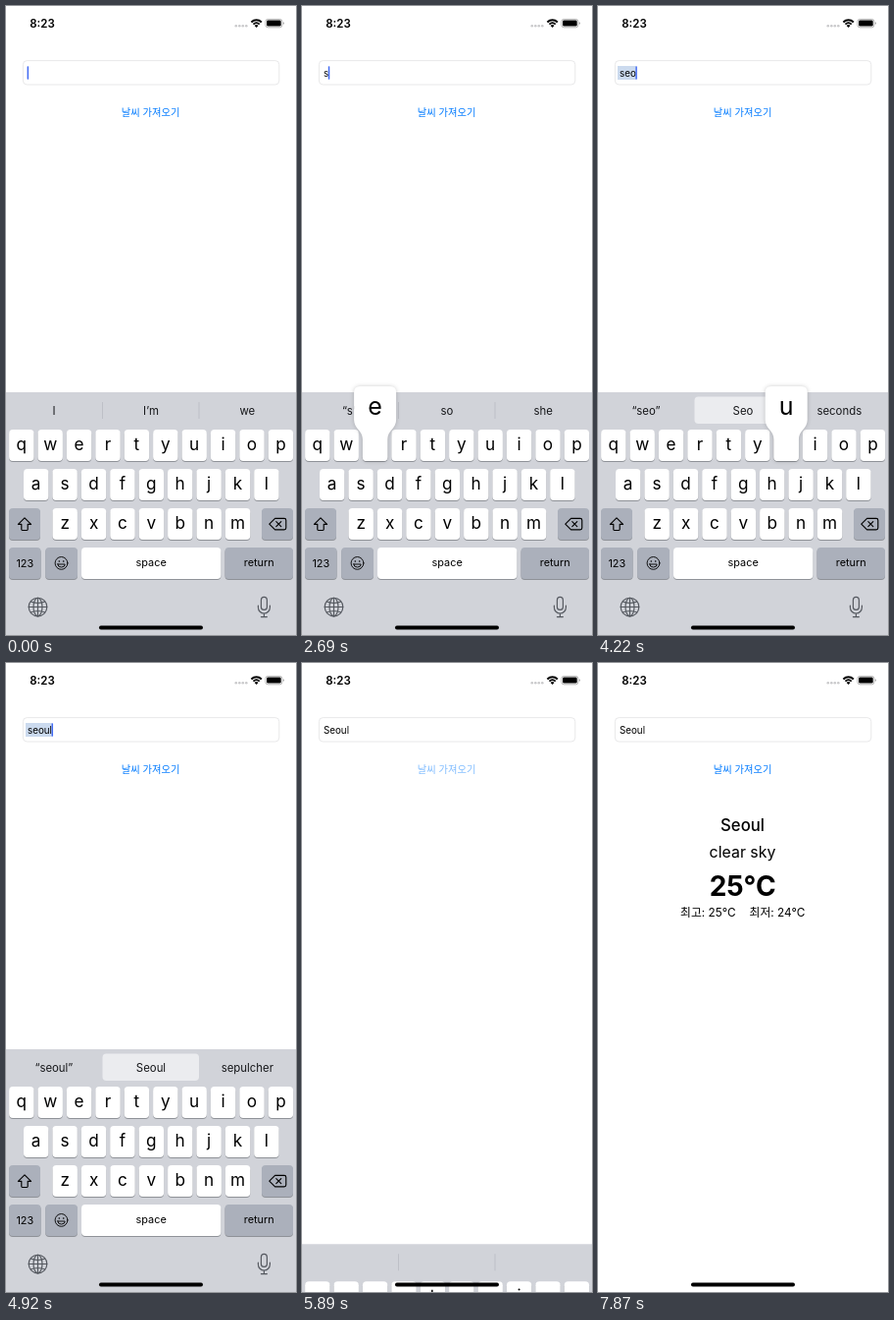
Recreate the animation shown at these times as an HTML page. Size 296 by 640 pixels, loop 8 s.

```html
<!DOCTYPE html>
<html lang="ko">
<head>
<meta charset="utf-8">
<title>Weather lookup</title>
<style>
  html, body { margin: 0; width: 100%; height: 100%; overflow: hidden; background: #fff; }
  svg { display: block; width: 100vw; height: 100vh; }
  text { font-family: Inter, "Noto Sans CJK KR", "Noto Sans CJK", sans-serif; text-anchor: middle; }
  .left { text-anchor: start; }
  .hangul { font-family: "Noto Sans CJK KR", "Noto Sans CJK", sans-serif; }
  .letter { font-size: 17.2px; }
  .label { font-size: 10.9px; }
  .line { fill: none; stroke: #000; stroke-width: 1.15; stroke-linecap: round; stroke-linejoin: round; }
  .thin { stroke-width: .9; }
  .gray { stroke: #53575e; }
  #popup { filter: drop-shadow(0 .5px 2px rgba(0, 0, 0, .2)); }
</style>
</head>
<body>
<svg id="stage" viewBox="0 0 296 640">
  <defs>
    <linearGradient id="sweep">
      <stop offset="0" stop-color="#16171a"/>
      <stop offset="1" stop-color="#16171a" stop-opacity="0"/>
    </linearGradient>
  </defs>
  <rect width="296" height="640" fill="#fff"/>

  <g id="status">
    <text x="37" y="22" font-size="11.5" font-weight="600">8:23</text>
    <g fill="#c9c9cb">
      <circle cx="234.8" cy="20.3" r="1.3"/><circle cx="238.3" cy="20.3" r="1.3"/>
      <circle cx="241.8" cy="20.3" r="1.3"/><circle cx="245.3" cy="20.3" r="1.3"/>
    </g>
    <path d="M250.4 16.5a7.3 7.3 0 0 1 10.4 0M252.5 18.6a4.4 4.4 0 0 1 6.2 0" fill="none" stroke="#000" stroke-width="1.9"/>
    <path d="M255.6 22l-1.9-2a2.7 2.7 0 0 1 3.8 0z"/>
    <rect x="264.9" y="13.4" width="17" height="8.4" rx="2.4" fill="none" stroke="#a3a3a3" stroke-width=".8"/>
    <rect x="266.1" y="14.6" width="14.6" height="6" rx="1.4"/>
    <path d="M282.8 16.2q1.2.4 1.2 1.4t-1.2 1.4z" fill="#a3a3a3"/>
  </g>

  <rect x="17.4" y="55.6" width="261.4" height="24.4" rx="4" fill="#fff" stroke="#e2e2e4" stroke-width=".8"/>
  <rect id="marked" x="20" y="61" height="14" fill="#cbdaee"/>
  <text id="city" class="left" x="22" y="71.8" font-size="9.8"></text>
  <rect id="caret" y="61.3" width="1.5" height="13.4" rx=".6" fill="#426bf2"/>
  <text id="button" class="hangul" x="147.6" y="111.6" font-size="10.3" fill="#007aff">날씨 가져오기</text>

  <g id="weather">
    <text x="147.5" y="171.2" font-size="16.7" font-weight="500">Seoul</text>
    <text x="147.5" y="198.4" font-size="15.9">clear sky</text>
    <text x="147.7" y="237.2" font-size="28" font-weight="700">25°C</text>
    <text x="112.4" y="258" font-size="11.8">최고: 25°C</text>
    <text x="183" y="258" font-size="11.8">최저: 24°C</text>
  </g>

  <g id="keyboard">
    <rect y="393" width="296" height="250" fill="#d1d3d9"/>
    <path id="dividers" d="M98.5 403v17M197 403v17" stroke="#b9bcc3" stroke-width=".8"/>
    <rect id="choice" x="98.5" y="397.5" width="98.5" height="27.5" rx="4" fill="#ebecef"/>
    <g id="hints" font-size="11.4" fill="url(#sweep)">
      <text x="49" y="415.6"></text><text x="148" y="415.6"></text><text x="246.3" y="415.6"></text>
    </g>
    <g id="keys"></g>
    <path class="line" d="M19 520.8l-6.6 6.5h3.4v5.3q0 .9.9.9h4.6q.9 0 .9-.9v-5.3h3.4z"/>
    <path class="line" d="M274.6 521.4h9.4q1.8 0 1.8 1.8v7.8q0 1.8-1.8 1.8h-9.4l-5.8-5.7zM275.8 524.6l5 5m0-5l-5 5"/>
    <g>
      <circle class="line thin" cx="56.5" cy="566.9" r="6.4"/>
      <circle cx="54.3" cy="565" r=".8"/><circle cx="58.7" cy="565" r=".8"/>
      <path class="line thin" d="M52.8 568h7.4a3.7 3 0 0 1-7.4 0z"/>
    </g>
    <g class="line gray">
      <circle cx="32.5" cy="611.5" r="9.3"/><ellipse cx="32.5" cy="611.5" rx="4.5" ry="9.3"/>
      <path d="M32.5 602.2v18.6M23.2 611.5h18.6M25.2 606q7.3 3 14.6 0M25.2 617q7.3-3 14.6 0"/>
      <rect x="260.4" y="601.4" width="6" height="13" rx="3"/>
      <path d="M257.4 610v2a6 6 0 0 0 12 0v-2M263.4 618v3.6M260.4 621.6h6"/>
    </g>
    <g id="popup">
      <path d="M-12.7 28V10C-12.7 1-21.5-1-21.5-10V-38q0-6 6-6h31q6 0 6 6V-10C21.5-1 12.7 1 12.7 10V28q0 4-4 4H-8.7q-4 0-4-4z" fill="#fff"/>
      <text y="-14.8" font-size="25"></text>
    </g>
  </g>

  <rect x="95" y="630.6" width="106" height="3.8" rx="1.9"/>
</svg>
<script>
const LOOP = 8000, DISMISS = 5715, RESULT = 6710;
const $ = selector => document.querySelector(selector);
const show = (el, on) => el.setAttribute('visibility', on ? 'visible' : 'hidden');

const idle = ['I', 'I’m', 'we'];
const afterS = ['“s”', 'so', 'she'];
const afterSe = ['“se”', 'she', 'see'];
const afterSeo = ['“seo”', 'Seo', 'seconds'];
const afterSeou = ['“seou”', 'Seoul', 'sepulcher'];
const afterSeoul = ['“seoul”', 'Seoul', 'sepulcher'];

// time, field text, pressed key, suggestions
const typing = [
  [0, '', '', idle],
  [2200, '', 's', idle],
  [2440, 's', '', idle],
  [2550, 's', '', afterS],
  [2690, 's', 'e', afterS],
  [2950, 'se', '', afterSe],
  [3590, 'se', 'o', afterSe],
  [3820, 'seo', '', afterSe],
  [3970, 'seo', '', afterSeo],
  [4110, 'seo', 'u', afterSeo],
  [4340, 'seou', '', afterSeo],
  [4450, 'seou', '', afterSeou],
  [4680, 'seou', 'l', afterSeou],
  [4920, 'seoul', '', afterSeoul],
  [DISMISS, 'Seoul', '', afterSeoul]
];
const blink = [[0, 1], [530, .5], [650, 0], [890, .5], [1010, 1], [1550, .5], [1670, 0],
  [1920, .06], [2030, 1], [5390, .5], [5510, 0]];
const buttonFade = [[5659, 1], [5660, .25], [5770, .3], [6150, 1]];

const keyAt = {};
function addKey(x, y, width, fill, label, className, baseline) {
  const box = (top, color) =>
    `<rect x="${x}" y="${top}" width="${width}" height="32" rx="4" fill="${color}"/>`;
  $('#keys').insertAdjacentHTML('beforeend', box(y + .9, '#8f9298') + box(y, fill) +
    `<text class="${className}" x="${x + width / 2}" y="${y + baseline}">${label}</text>`);
}
[['qwertyuiop', 15.8], ['asdfghjkl', 30.7], ['zxcvbnm', 60.2]].forEach(([letters, first], row) => {
  [...letters].forEach((letter, i) => {
    const x = first + i * 29.4, y = 431 + row * 40;
    keyAt[letter] = [x, y];
    addKey(x - 12.7, y, 25.4, '#fff', letter, 'letter', 20.6);
  });
});
const dark = '#abb0bb';
addKey(3, 511, 32, dark, '', 'label', 20);
addKey(261, 511, 32, dark, '', 'label', 20);
addKey(3, 551, 32.6, dark, '123', 'label', 19.8);
addKey(40.2, 551, 32.8, dark, '', 'label', 20);
addKey(77, 551, 142.4, '#fff', 'space', 'label', 19.4);
addKey(223.5, 551, 69.5, dark, 'return', 'label', 19.4);

const latest = (table, t) => table.findLast(row => row[0] <= t);

function ramp(table, t) {
  const next = table.findIndex(row => row[0] > t);
  if (next < 0) return table[table.length - 1][1];
  if (next === 0) return table[0][1];
  const [t0, a] = table[next - 1], [t1, b] = table[next];
  return a + (b - a) * (t - t0) / (t1 - t0);
}

// critically damped spring, 0 to 1
function spring(ms) {
  const x = Math.max(0, ms) * .01835;
  return 1 - Math.exp(-x) * (1 + x);
}

function render(t) {
  const held = t < 5660 ? t : 5660 + Math.floor((t - 5660) / 110) * 110;
  const [, text, key, words] = latest(typing, held);
  const pending = text.length > 1 && held < DISMISS;

  $('#city').textContent = text;
  const length = text ? $('#city').getComputedTextLength() : 0;
  $('#caret').setAttribute('x', 21.6 + length);
  $('#caret').setAttribute('opacity', latest(blink, t)[1]);
  $('#marked').setAttribute('width', length + 2);
  show($('#marked'), pending);
  show($('#choice'), pending);
  show($('#dividers'), !pending);

  document.querySelectorAll('#hints text').forEach((el, i) => { el.textContent = words[i]; });
  const edge = 1 - Math.max(0, held - DISMISS) / 55 * .8;
  $('#sweep').setAttribute('x1', edge);
  $('#sweep').setAttribute('x2', edge + .85);

  show($('#popup'), key);
  if (key) {
    $('#popup').setAttribute('transform', `translate(${keyAt[key]})`);
    $('#popup text').textContent = key;
  }

  $('#button').setAttribute('opacity', ramp(buttonFade, held));
  $('#keyboard').setAttribute('transform', `translate(0 ${246.3 * spring(held - DISMISS)})`);
  $('#keyboard').setAttribute('display', t < RESULT ? 'inline' : 'none');
  show($('#weather'), t >= RESULT);
}

const start = performance.now();
function tick() {
  render((performance.now() - start) % LOOP);
  requestAnimationFrame(tick);
}
tick();
</script>
</body>
</html>
```
